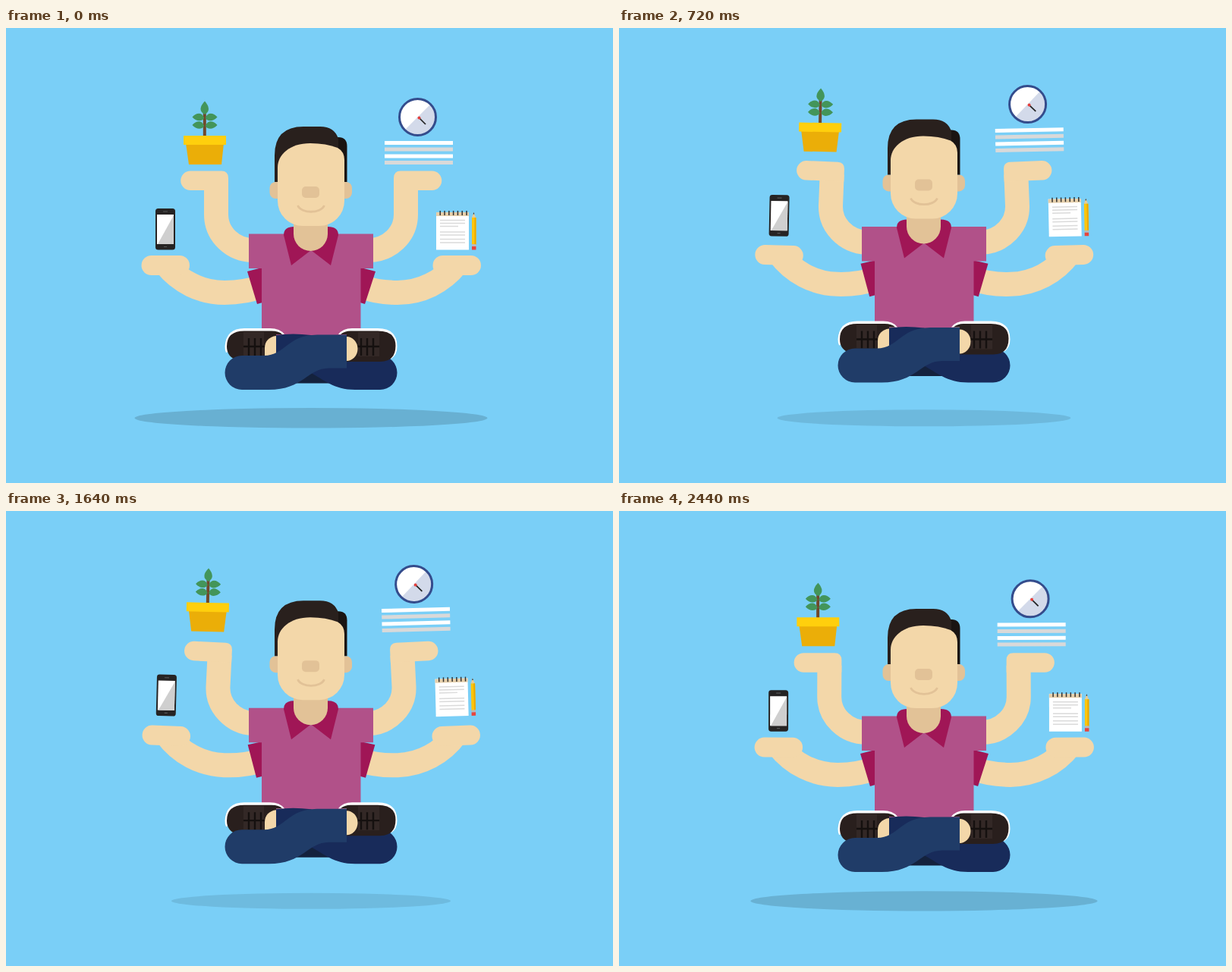
Recreate the animation shown at these times as an HTML page. Size 800 by 600 pixels, loop 2.52 s.

```html
<!DOCTYPE html>
<html lang="en">
<head>
<meta charset="utf-8">
<title>Multitasking meditation</title>
<style>
  html, body { margin: 0; width: 100%; height: 100%; overflow: hidden; background: #7acff7; }
  svg { display: block; width: 100%; height: 100%; }
  .skin { fill: #f3d7a9; }
  .shade { fill: #e2c297; }
  .arm { fill: none; stroke: #f3d7a9; stroke-width: 32; }
  .shirt { fill: #b15189; }
  .trim { fill: #a01656; }
  .shoe { fill: #291f1d; }
  .tongue { fill: #332826; }
  .lace { stroke: #15100f; stroke-width: 2.4; fill: none; }
</style>
</head>
<body>
<svg viewBox="0 0 800 600">
  <ellipse id="shadow" rx="232.5" ry="13.3"/>

  <g id="body">
    <g id="armUL">
      <path class="arm" d="M277 205V246A49 47 0 0 0 326 293H340"/>
      <path class="skin" d="M243 188.500H284Q293 188.500 293 198V214H243A12.750 12.750 0 0 1 243 188.500Z"/>
    </g>
    <g id="armUR">
      <path class="arm" d="M527 205V246A49 47 0 0 1 478 293H464"/>
      <path class="skin" d="M561.500 188.500H520Q511 188.500 511 198V214H561.500A12.750 12.750 0 0 0 561.500 188.500Z"/>
    </g>
    <g id="armLL">
      <path class="arm" d="M210 311A99 99 0 0 0 288 349Q315 349 340 340"/>
      <rect class="skin" x="178.500" y="300" width="63.500" height="26" rx="13"/>
      <path class="trim" d="M318 321L345 314V360L331 364Z"/>
    </g>
    <g id="armLR">
      <path class="arm" d="M594 311A99 99 0 0 1 516 349Q489 349 464 340"/>
      <rect class="skin" x="562.500" y="300" width="63.500" height="26" rx="13"/>
      <path class="trim" d="M487 321L460 314V360L473 364Z"/>
    </g>

    <path class="shirt" d="M320 271.500H484V317H467.500V410H337V317H320Z"/>
    <path class="trim" d="M380 262Q366 262 366 273L376 313L402 293L428 313L438 273Q438 262 424 262Z"/>
    <path class="shade" d="M379 250H424V271.500A22.500 22.500 0 0 1 379 271.500Z"/>

    <rect class="shade" x="347.500" y="203" width="20" height="22" rx="8"/>
    <rect class="shade" x="436" y="203" width="20" height="22" rx="8"/>
    <path fill="#1a1412" d="M430 144H438Q449.500 144 449.500 156V203H430Z"/>
    <path fill="#29201d" d="M354 203V168Q354 130 392 130H414Q433 130 438 146V180H446V203Z"/>
    <path class="skin" d="M358 184C358 167 374 152 401 152Q422 152 437 158Q446 163 446 174V228A33 33 0 0 1 413 261H391A33 33 0 0 1 358 228Z"/>
    <rect class="shade" x="390" y="209" width="23" height="15" rx="5"/>
    <path d="M384.500 234C389 245 415 245 419.500 234" fill="none" stroke="#e2c297" stroke-width="2.800"/>

    <path fill="#14223d" d="M374 468.500L402 450L430 468.500Z"/>
    <path fill="#182b5a" d="M356 405Q378 402 402 405L449 432H493A22.500 22.500 0 0 1 493 477H460C432 477 418 463 402 455L356 434Z"/>

    <path fill="#fff" d="M290 428Q288.500 425 288.500 420Q290 396 314 396H348Q361 396 367 404H356Z"/>
    <path class="shoe" d="M291 420Q291 399.500 314 399.500H350Q360 399.500 364 404H356V438H305Q291 434 291 420Z"/>
    <path class="tongue" d="M313 401H340V432H313Z"/>
    <path class="lace" d="M320 409V432M328 409V432M336 409V432M313 420H342"/>
    <path class="skin" d="M356 406C347 407 341 413 341 422V433H356Z"/>

    <path fill="#203c68" d="M311 432H340C368 432 370 405 410 404.500H449V448.500H426C396 449 393 477 346 477H311A22.500 22.500 0 0 1 311 432Z"/>

    <path fill="#fff" d="M438 404Q444 396 456 396H490Q515.500 396 515.500 420Q515.500 431 508 436L449 404Z"/>
    <path class="shoe" d="M441 404Q446 399.500 454 399.500H490Q513.500 399.500 513.500 419Q513.500 440 493 440H449V404Z"/>
    <path class="tongue" d="M464 401H492V433H464Z"/>
    <path class="lace" d="M468 409V432M476 409V432M484 409V432M463 420H492"/>
    <path class="skin" d="M449 407A14.500 16 0 0 1 449 439Z"/>
  </g>

  <g id="plant">
    <path d="M261.800 110V143" stroke="#71492b" stroke-width="4"/>
    <g fill="#43955a">
      <path d="M262 96.500Q272 108 262 114Q251 108 262 96.500Z"/>
      <path id="leaves" d="M261 118C258 110 250 112 245.500 117.500C250 123 258 124 261 119ZM263 118C266 110 274 112 278.500 117.500C274 123 266 124 263 119Z"/>
      <use href="#leaves" y="10.500"/>
    </g>
    <path fill="#ebae08" d="M237 152H287L284 180H241Z"/>
    <path fill="#ffcf0d" d="M234 142H290V154H234Z"/>
  </g>

  <g id="clock">
    <circle cx="542.500" cy="117.500" r="24" fill="#fff"/>
    <path fill="#d3daea" d="M559.500 100.500A24 24 0 0 1 525.500 134.500Z"/>
    <circle cx="542.500" cy="117.500" r="24" fill="none" stroke="#344c8c" stroke-width="3"/>
    <path d="M545 119L553 127" stroke="#222" stroke-width="1.700"/>
    <circle cx="544.500" cy="118.500" r="2" fill="#e5403c"/>
    <path d="M499 151.500H589M499 169H589" stroke="#fff" stroke-width="5"/>
    <path d="M499 160H589M499 177.500H589" stroke="#d9d9d9" stroke-width="5"/>
  </g>

  <g id="phone">
    <rect x="197" y="238" width="26" height="54.500" rx="3.500" fill="#262424"/>
    <path fill="#fff" d="M199 246H221V285H199Z"/>
    <path fill="#cfcfcf" d="M221 247V285H200Z"/>
    <path d="M207 242H213M208 288.500H212" stroke="#555" stroke-width="1.200"/>
  </g>

  <g id="notes">
    <path fill="#fff" d="M567 243H610V292.500H567Z"/>
    <path fill="#e6cfaa" d="M567 243H610V248H567Z"/>
    <path d="M571.500 244H608" stroke="#333" stroke-width="6" stroke-dasharray="1.500 4.300"/>
    <path d="M572 253.500H605M572 257.500H605M572 261.500H596M572 269H605M572 273H605M572 278.500H605M572 283H605" stroke="#dadada" stroke-width="1.400"/>
    <path fill="#e9cb96" d="M614 250L616.500 243L619 250Z"/>
    <path fill="#333" d="M615.600 245.500L616.500 243L617.400 245.500Z"/>
    <path fill="#ffc60b" d="M614 250H619.500V286H614Z"/>
    <path fill="#e9a800" d="M617.500 250H619.500V286H617.500Z"/>
    <path fill="#b9b9b9" d="M614 285H619.500V288H614Z"/>
    <path fill="#e8453c" d="M614 288H619.500V292.500H614Z"/>
  </g>
</svg>
<script>
  const LOOP = 2520, STEP = 40, LAST = 2440, RISE = 1250;

  // Shoulder pivots: [id, full angle, x, y]
  const arms = [
    ['armUL', 4, 342, 295], ['armUR', -4, 462, 295],
    ['armLL', 3, 340, 338], ['armLR', -3, 464, 338],
  ];
  // Floating things: [id, full dx, full dy, full angle, centre x, centre y]
  const things = [
    ['plant', 5.4, -29.4, 1.8, 262, 150], ['clock', -6, -29.4, -2, 544, 140],
    ['phone', 1.9, -31, 2, 210, 265], ['notes', -1.3, -30.8, -2, 593, 268],
  ];

  const shadow = document.getElementById('shadow');
  const place = (id, transform) =>
    document.getElementById(id).setAttribute('transform', transform);

  function draw(now) {
    const t = Math.min(Math.floor(now % LOOP / STEP) * STEP, LAST);
    const lift = Math.min(t, 1.027 * (2510 - t), RISE) / RISE;

    place('shadow', `translate(402 514.300) scale(${1 - 0.291 * lift})`);
    shadow.setAttribute('opacity', 0.15 - 0.075 * lift);
    place('body', `translate(0 ${-16.6 * lift})`);
    for (const [id, angle, x, y] of arms)
      place(id, `rotate(${angle * lift} ${x} ${y})`);
    for (const [id, dx, dy, angle, x, y] of things)
      place(id, `translate(${dx * lift} ${dy * lift}) rotate(${angle * lift} ${x} ${y})`);
  }

  const start = performance.now();
  function tick() {
    draw(performance.now() - start);
    requestAnimationFrame(tick);
  }
  tick();
</script>
</body>
</html>
```
